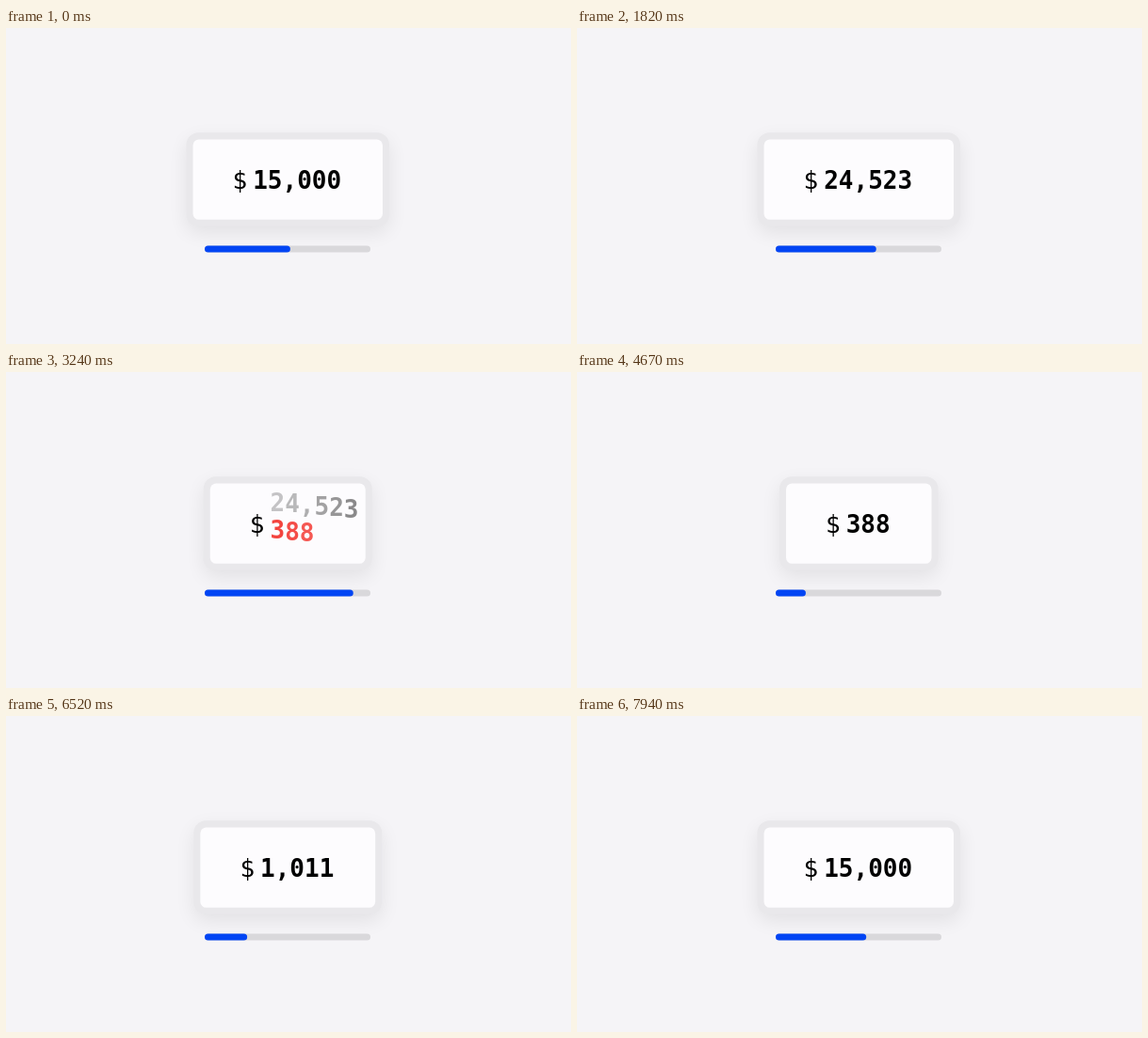
An HTML page with a canvas that plays this animation: 600x336 px, repeating every 7.97 s.

```html
<!DOCTYPE html>
<html lang="en">
<head>
<meta charset="utf-8">
<title>Price ticker</title>
<style>
  html, body { margin: 0; width: 100%; height: 100%; overflow: hidden; background: #f5f4f7; }
  canvas { display: block; }
</style>
</head>
<body>
<canvas id="stage" width="600" height="336"></canvas>
<script>
const ctx = document.getElementById('stage').getContext('2d');
const LOOP = 7970, PERIOD = 2000, FIRST = 1034;
const MOVE = 350, STAGGER = 15, TRAVEL = 29.5;
const ADVANCE = 15.67, BASELINE = 170.8, CENTER = 299.25;
const FACE = '26px "DejaVu Sans Mono", monospace';
const values = [15000, 24523, 388, 1011];
const labels = values.map(v => v.toLocaleString('en-US'));

const clamp = v => Math.min(1, Math.max(0, v));
const mix = (a, b, k) => a + (b - a) * k;

// cubic-bezier(0, 0, .58, 1)
function easeOut(x) {
  x = clamp(x);
  let lo = 0, hi = 1;
  for (let i = 0; i < 20; i++) {
    const s = (lo + hi) / 2;
    if (1.74 * s * s - 0.74 * s ** 3 < x) lo = s; else hi = s;
  }
  return 3 * lo * lo - 2 * lo ** 3;
}

function box(x, y, w, h, r, color) {
  ctx.fillStyle = color;
  ctx.beginPath();
  ctx.roundRect(x, y, w, h, Math.min(r, w / 2));
  ctx.fill();
}

function glyph(char, x, y, color, alpha) {
  if (!char || alpha <= 0) return;
  ctx.globalAlpha = alpha;
  ctx.fillStyle = color;
  ctx.fillText(char, x, y);
  ctx.globalAlpha = 1;
}

function drawCard(left, width) {
  ctx.save();
  ctx.shadowColor = 'rgba(0,0,0,.08)';
  ctx.shadowBlur = 20;
  ctx.shadowOffsetY = 7;
  box(left - 7, 111.3, width + 14, 99.4, 13, '#e9e8eb');
  ctx.restore();
  box(left, 118.4, width, 85.4, 6.5, '#fdfcfe');
}

function drawDigits(from, to, x, age, up) {
  const sign = up ? 1 : -1;
  const tint = up ? [4, 112, 2] : [240, 14, 6];
  const count = Math.max(from.length, to.length);
  ctx.font = 'bold ' + FACE;
  for (let i = 0; i < count; i++, x += ADVANCE) {
    if (from[i] === to[i]) {
      glyph(to[i], x, BASELINE, '#000', 1);
      continue;
    }
    const time = age - i * STAGGER;
    const p = easeOut(time / MOVE);
    const glow = 1 - clamp((time - MOVE) / 300);
    const color = `rgb(${tint.map(c => Math.round(c * glow))})`;
    glyph(from[i], x, BASELINE + sign * TRAVEL * p, '#000', 1 - p);
    glyph(to[i], x, BASELINE - sign * TRAVEL * (1 - p), color, p);
  }
}

function draw(t) {
  const step = Math.floor((t - FIRST) / PERIOD);
  const age = t - FIRST - step * PERIOD;
  const prev = (step + 4) % 4, next = (step + 5) % 4;
  const from = labels[prev], to = labels[next];

  const chars = mix(from.length, to.length, easeOut(age / MOVE));
  const width = 107.5 + ADVANCE * chars;
  const left = CENTER - width / 2;

  ctx.fillStyle = '#f5f4f7';
  ctx.fillRect(0, 0, 600, 336);
  drawCard(left, width);

  ctx.font = FACE;
  glyph('$', left + 42.1, BASELINE, '#000', 1);
  drawDigits(from, to, left + 63.7, age, values[next] > values[prev]);

  box(211, 231.4, 176, 7, 3.5, '#d9d8db');
  box(211, 231.4, 176 * (1 - age / PERIOD), 7, 3.5, '#0145f4');
}

const start = performance.now();
function frame() {
  draw((performance.now() - start) % LOOP);
  requestAnimationFrame(frame);
}
frame();
</script>
</body>
</html>
```
